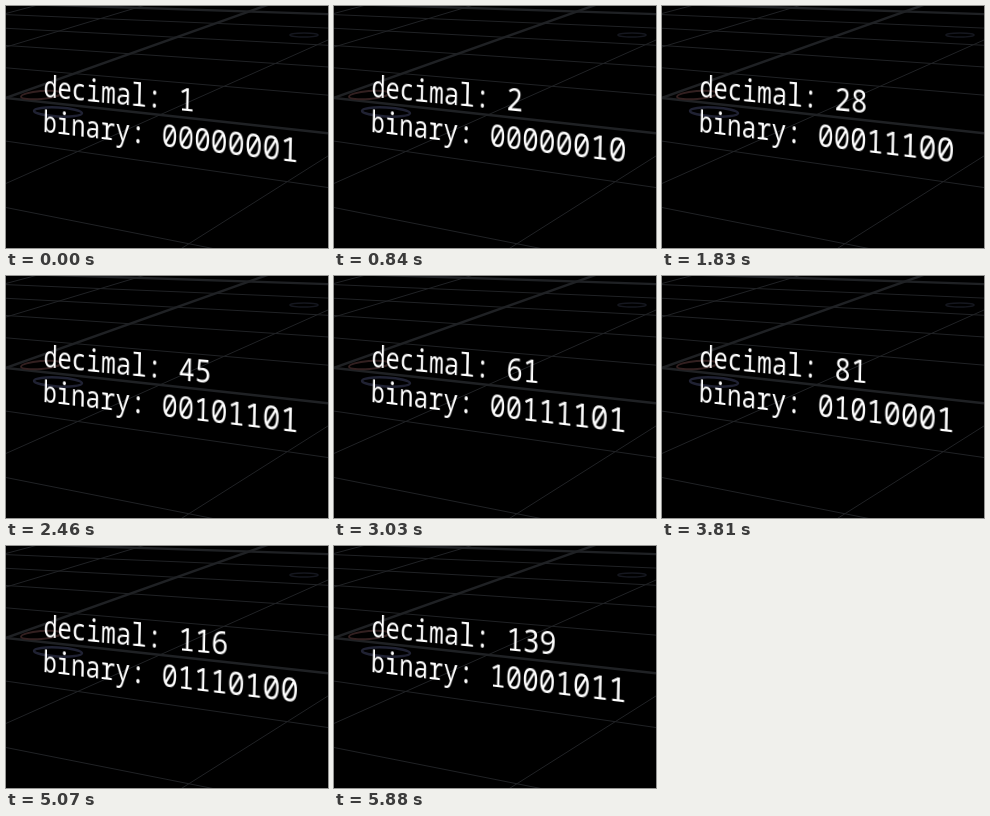
These frames come from a looping animation (322x242 px, 5.91 s). An HTML page:

```html
<!DOCTYPE html>
<html lang="en">
<head>
<meta charset="utf-8">
<title>Binary counter</title>
<style>
  html, body { margin: 0; width: 100%; height: 100%; overflow: hidden; background: #000; }
  #stage { position: relative; width: 322px; height: 242px; overflow: hidden; background: #000; }
  svg { position: absolute; left: 0; top: 0; overflow: visible; }
  #label {
    transform-origin: 0 0;
    font: 500 30px "Noto Sans Mono", "DejaVu Sans Mono", monospace;
    fill: #fff;
  }
  #label text { white-space: pre; }
</style>
</head>
<body>
<div id="stage">
  <svg width="322" height="242" fill="none">
    <g id="grid"></g>
    <ellipse cx="35" cy="89" rx="20" ry="4" stroke="#332020" stroke-width="2" transform="rotate(-5 35 89)"/>
    <ellipse cx="52" cy="106" rx="24" ry="4.5" stroke="#202233" stroke-width="2.5" transform="rotate(3 52 106)"/>
    <ellipse cx="298" cy="29" rx="14" ry="2" stroke="#15171f" stroke-width="1.5"/>
  </svg>
  <svg id="label" width="300" height="80">
    <text id="dec" x="0" y="21.4"></text>
    <text id="bin" x="0" y="58"></text>
  </svg>
</div>
<script>
const $ = id => document.getElementById(id);

// Evenly spaced floor lines that meet at a vanishing point (vx, vy);
// height at the left edge follows 1 / depth below the horizon.
function floorLines(vx, vy, horizon, near, step, from, to) {
  let out = "";
  for (let i = from; i <= to; i++) {
    const y = horizon + 1 / (near - step * i);
    const end = y + (vy - y) / vx * 322;
    const major = i % 5 === 0;
    out += `<path d="M0 ${y}L322 ${end}" stroke="${major ? "#1f2124" : "#202225"}" stroke-width="${major ? 2.4 : 1}"/>`;
  }
  return out;
}
$("grid").innerHTML =
  floorLines(-1235, -43, -110, 0.00495, 0.00087, -5, 2) +
  floorLines(946, -244, -157, 0.00402, 0.00103, -2, 2);

// Text plane in perspective
const cell = 18;        // glyph advance before projection
const left = 37.9, top0 = 70.9;
const width = 13.85;    // first projected cell
const k = 0.00844;      // depth change per cell
const drop = 1.195;     // fall per cell
const tall = 0.9477, lean = -0.02;
$("label").style.transform = `matrix3d(${[
  (width - left * k) / cell, (drop - top0 * k) / cell, 0, -k / cell,
  lean, tall, 0, 0,
  0, 0, 1, 0,
  left, top0, 0, 1
].map(n => n.toFixed(7)).join(",")})`;

// Count over time: ms, value
const loop = 5910, tick = 30;
const keys = [[810, 2], [1830, 28], [3030, 61], [3810, 81], [5070, 116], [5880, 139]];

function count(ms) {
  const t = Math.floor(ms / tick + 1e-6) * tick;
  if (t < keys[0][0]) return 1;
  const i = keys.findIndex(key => key[0] > t);
  if (i < 0) return keys.at(-1)[1];
  const [t0, n0] = keys[i - 1], [t1, n1] = keys[i];
  return Math.floor(n0 + (n1 - n0) * (t - t0) / (t1 - t0) + 1e-6);
}

let shown, start;
function draw(now) {
  start ??= now;
  const n = count(Math.max(0, now - start) % loop);
  if (n !== shown) {
    shown = n;
    $("dec").textContent = "decimal: " + n;
    $("bin").textContent = "binary: " + n.toString(2).padStart(8, "0");
  }
  requestAnimationFrame(draw);
}
draw(performance.now());
</script>
</body>
</html>
```
